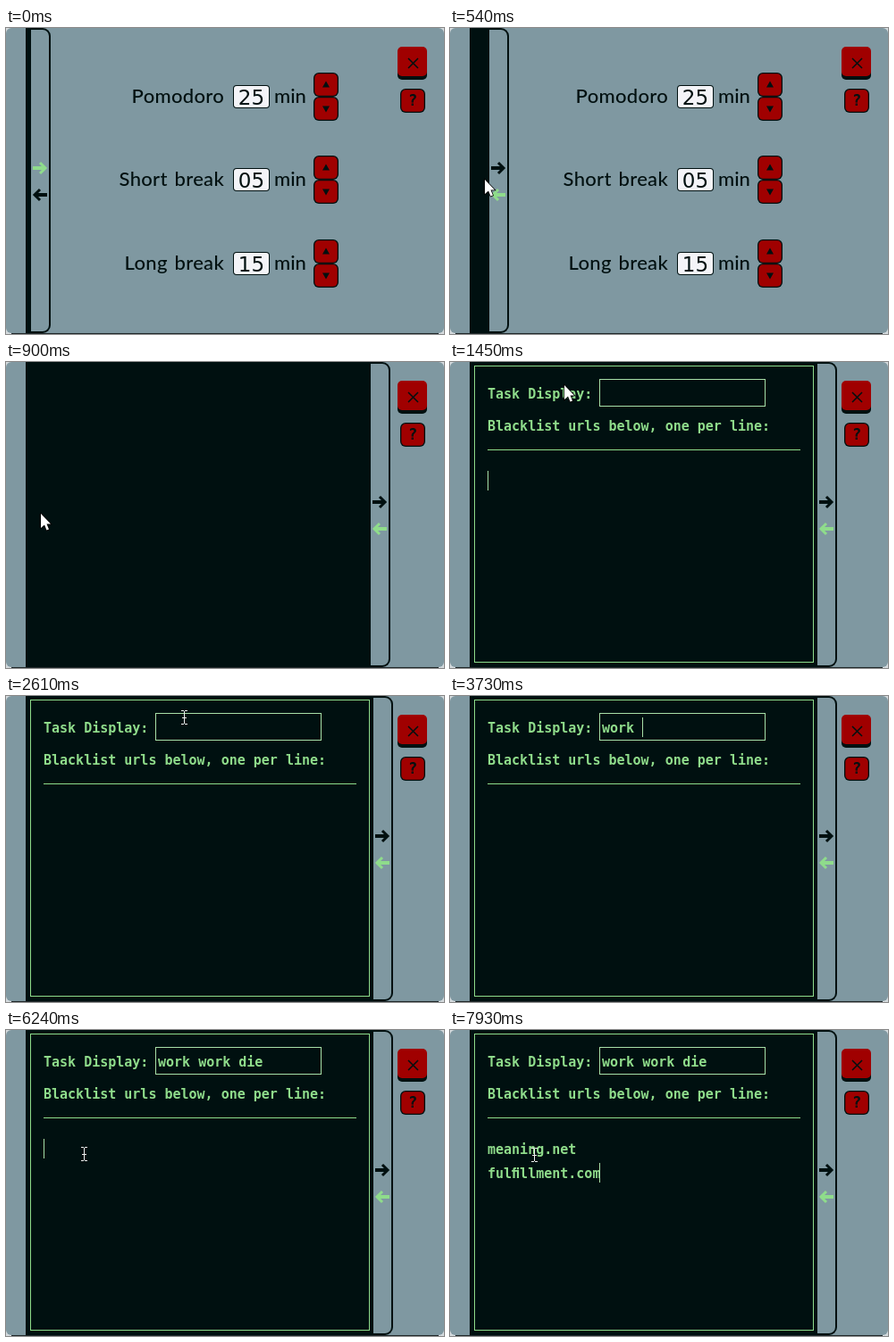
These frames come from a looping animation (490x343 px, 7.99 s). An HTML page with a canvas:

```html
<!DOCTYPE html>
<html lang="en">
<head>
<meta charset="utf-8">
<title>Timer settings</title>
<style>
  html, body { margin: 0; width: 100%; height: 100%; overflow: hidden; background: #d4dadd; }
  canvas { display: block; }
</style>
</head>
<body>
<canvas id="stage" width="490" height="343"></canvas>
<script>
const ctx = document.getElementById('stage').getContext('2d');
const LOOP = 7990, OPEN = 540, PASTE = 7150, KEY_GAP = 112, BLINK = 500;
const SLATE = '#7f98a1', INK = '#001010', RED = '#a00000', GREEN = '#8fdc8b', PALE = '#a8dfa8';
const MONO = 'bold 15px "DejaVu Sans Mono", monospace';
const LABEL = '500 22px Lato, sans-serif';

const TIMERS = [['Pomodoro', '25'], ['Short break', '05'], ['Long break', '15']];
const URLS = ['meaning.net', 'ful\ufb01llment.com'];
const BURSTS = [['work ', 3280], ['wor', 4040], ['k ', 4580], ['die', 5000]];

// The pointer rests after each move until it hides or moves on.
const MOVES = [
  { at: 60, until: 240, from: [-6, 178], to: [39, 170] },
  { at: 1150, until: 1450, from: [39, 170], to: [128, 26] },
  { at: 1450, until: 2110, from: [128, 26], to: [199, 24], hide: 3280 },
  { at: 5480, until: 5910, from: [199, 28], to: [87, 139], hide: PASTE },
  { at: 7570, until: 7930, from: [86, 140], to: [94, 140], hide: LOOP }
];

const clamp = v => Math.max(0, Math.min(1, v));
const progress = (t, from, to) => clamp((t - from) / (to - from));
const mix = (a, b, p) => a + (b - a) * p;

// The CSS "ease" curve, solved by bisection
function ease(p) {
  let lo = 0, hi = 1;
  for (let i = 0; i < 20; i++) {
    const s = (lo + hi) / 2;
    if (0.75 * s * (1 - s) + s ** 3 < p) lo = s; else hi = s;
  }
  return 0.3 * lo * (1 - lo) ** 2 + 3 * lo * lo * (1 - lo) + lo ** 3;
}

function rect(x, y, w, h, color) {
  ctx.fillStyle = color;
  ctx.fillRect(x, y, w, h);
}

function frame(x, y, w, h, color) {
  ctx.strokeStyle = color;
  ctx.lineWidth = 1;
  ctx.strokeRect(x + 0.5, y + 0.5, w - 1, h - 1);
}

function round(x, y, w, h, r, color) {
  ctx.beginPath();
  ctx.roundRect(x, y, w, h, r);
  ctx.fillStyle = color;
  ctx.fill();
}

// A rounded box with its border inside the given size
function box(x, y, w, h, r, fill, line = 1) {
  round(x, y, w, h, r, INK);
  round(x + line, y + line, w - 2 * line, h - 2 * line, r - line, fill);
}

function text(s, x, y, font, color, align = 'left') {
  ctx.font = font;
  ctx.fillStyle = color;
  ctx.textAlign = align;
  ctx.fillText(s, x, y);
}

function triangle(x, y, w, h, color) {
  ctx.beginPath();
  ctx.moveTo(x - w, y);
  ctx.lineTo(x + w, y);
  ctx.lineTo(x, y + h);
  ctx.fillStyle = color;
  ctx.fill();
}

function stepper(y, dir) {
  box(344, y, 28, 27, 6, RED, 1.3);
  triangle(358, y + 13.5 + 3 * dir, 4, -7 * dir, INK);
}

function drawSettings() {
  round(0, 0, 490, 342, 6, SLATE);
  rect(6, 342, 478, 1, '#20282a');
  TIMERS.forEach(([name, value], i) => {
    const y = Math.floor(93.8 * i);
    ctx.letterSpacing = '0.3px';
    ctx.wordSpacing = '2px';
    text(name, 244, y + 84, LABEL, INK, 'right');
    ctx.letterSpacing = ctx.wordSpacing = '0px';
    text('min', 300, y + 84, LABEL, INK);
    box(254, y + 64, 41, 26, 4, '#f4f4f8');
    text(value, 274.5, y + 86, '23px "DejaVu Sans", sans-serif', INK, 'center');
    stepper(y + 50, 1);
    stepper(y + 77, -1);
  });
}

function drawButtons() {
  round(438, 24, 33, 34, 5, INK);
  round(438, 21, 33, 33, 5, RED);
  ctx.beginPath();
  for (const d of [-5.5, 5.5]) {
    ctx.moveTo(455.5 - d, 34);
    ctx.lineTo(455.5 + d, 45);
  }
  ctx.strokeStyle = INK;
  ctx.lineWidth = 1.5;
  ctx.stroke();
  box(441, 68, 28, 27, 6, RED, 1.3);
  text('?', 455, 87, 'bold 17px "DejaVu Sans Mono", monospace', INK, 'center');
}

function arrow(x, y, dir, color) {
  rect(x - 8 + (dir < 0 ? 4 : 0), y - 2, 12, 4, color);
  ctx.beginPath();
  ctx.moveTo(x, y - 6);
  ctx.lineTo(x + 6 * dir, y);
  ctx.lineTo(x, y + 6);
  ctx.strokeStyle = color;
  ctx.lineWidth = 3;
  ctx.stroke();
}

function drawDrawer(t) {
  const edge = Math.floor(mix(28, 412, ease(progress(t, 514, 956))));
  const opened = t >= OPEN;
  ctx.save();
  ctx.beginPath();
  ctx.rect(edge, 0, 30, 343);
  ctx.clip();
  box(edge - 12, 0, 34, 342, 9, SLATE, 2);
  ctx.restore();
  rect(22, 0, edge - 22, 342, INK);
  arrow(edge + 10, 157, 1, opened ? INK : GREEN);
  arrow(edge + 10, 187, -1, opened ? GREEN : INK);
}

function typedText(t) {
  return BURSTS.map(([s, at]) => s.slice(0, Math.max(0, Math.floor((t - at) / KEY_GAP) + 1))).join('');
}

function caret(x, y) {
  rect(x, y, 1, 22, PALE);
}

function drawCaret(t, typed) {
  const within = (from, to) => t >= from && t < to;
  const flash = from => within(from, from + BLINK);
  if (flash(1330) || flash(6240)) caret(42, 122);
  if (flash(2110) || within(3160, 5740)) caret(170 + 9 * typed, 24);
  if (within(PASTE, 7210) || t >= 7690) caret(167, 149);
}

function drawEditor(t) {
  ctx.globalAlpha = progress(t, 910, 1330);
  frame(27, 4, 380, 333, GREEN);
  text('Task Display:', 42, 41, MONO, GREEN);
  text('Blacklist urls below, one per line:', 42, 77, MONO, GREEN);
  rect(42, 98, 350, 1, GREEN);
  frame(167, 19, 186, 31, PALE);
  ctx.globalAlpha = 1;

  const typed = typedText(t);
  text(typed, 170, 41, MONO, GREEN);
  if (t >= PASTE) URLS.forEach((url, i) => text(url, 42, 139 + 27 * i, MONO, GREEN));
  drawCaret(t, typed.length);
}

function drawBeam(x, y) {
  const white = '#f0f0f0';
  rect(x, y - 7, 1, 14, white);
  rect(x - 2, y, 5, 1, white);
  for (const end of [y - 8, y + 7]) {
    rect(x - 3, end, 3, 1, white);
    rect(x + 1, end, 3, 1, white);
  }
}

function drawArrowPointer(x, y) {
  const shape = new Path2D(`M${x} ${y}v16l4 -3.5l2.5 6l2.5 -1l-2.5 -6h4.5z`);
  ctx.strokeStyle = '#000';
  ctx.lineWidth = 1.5;
  ctx.stroke(shape);
  ctx.fillStyle = '#fff';
  ctx.fill(shape);
}

function drawPointer(t) {
  const move = MOVES.filter(m => m.at <= t).pop();
  if (!move || t >= move.hide) return;
  const p = progress(t, move.at, move.until);
  const [x, y] = move.from.map((v, i) => Math.round(mix(v, move.to[i], p)));
  const overField = (x > 167 && y < 50) || y > 110;
  if (t > 1330 && overField) drawBeam(x, y);
  else drawArrowPointer(x, y);
}

function draw(t) {
  ctx.clearRect(0, 0, 490, 343);
  drawSettings();
  drawDrawer(t);
  drawButtons();
  if (t > 910) drawEditor(t);
  drawPointer(t);
}

const start = performance.now();
function tick() {
  draw((performance.now() - start) % LOOP);
  requestAnimationFrame(tick);
}
tick();
</script>
</body>
</html>
```
